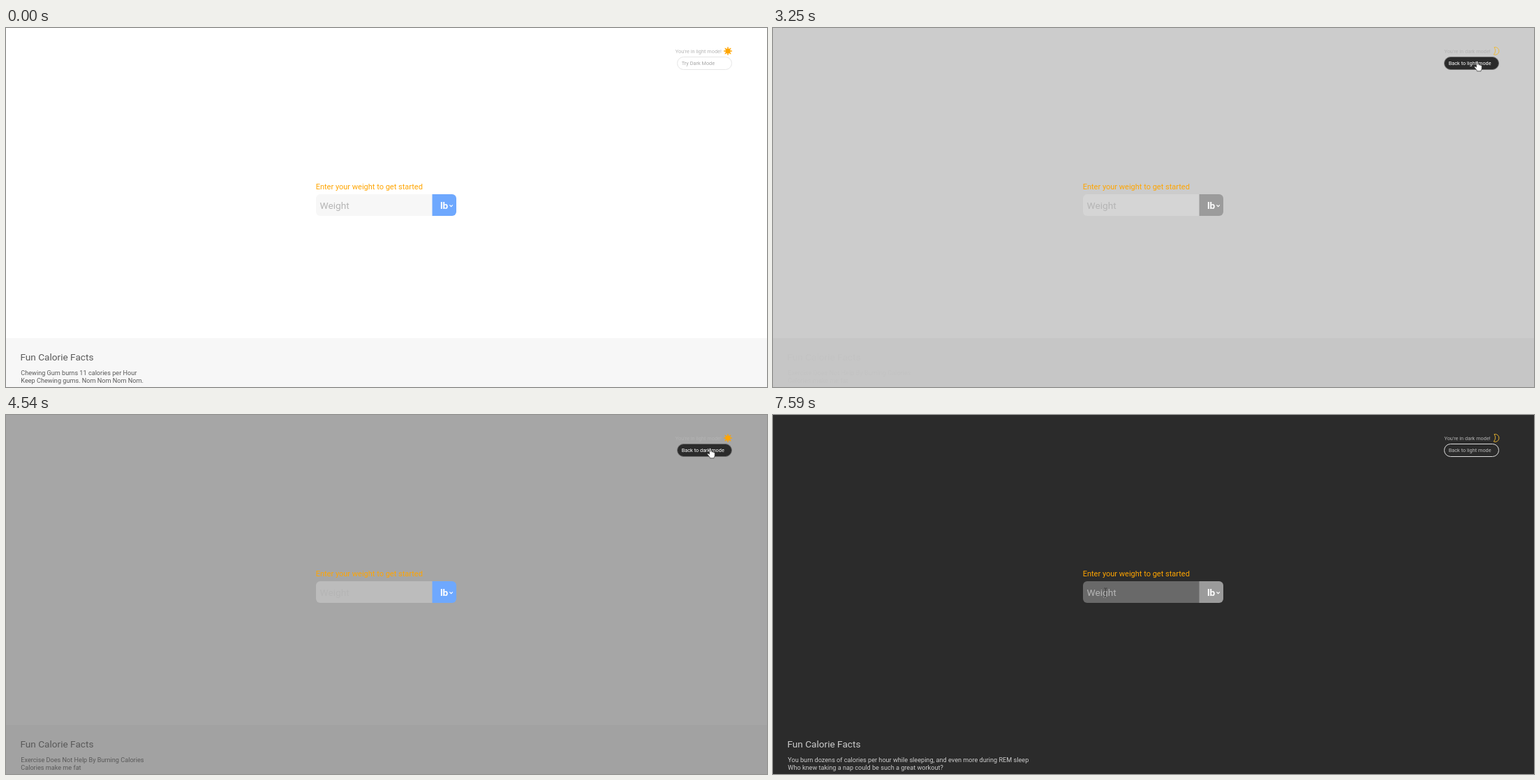
Write an HTML page that moves like this. It is 1090 px wide and 514 px high and loops after 8000 ms.

```html
<!DOCTYPE html>
<html lang="en">
<head>
<meta charset="utf-8">
<title>Calorie facts</title>
<style>
  html, body { margin: 0; width: 100%; height: 100%; overflow: hidden; background: #fff; }
  svg { display: block; width: 1090px; height: 514px; font-family: Roboto, sans-serif; }
  text { white-space: pre; }
</style>
</head>
<body>
<svg viewBox="0 0 1090 514" xmlns="http://www.w3.org/2000/svg">
  <rect id="page" width="1090" height="514"/>
  <rect id="footer" y="444" width="1090" height="70"/>

  <text id="modeText" y="35.6" font-size="7.35" fill="#b4b4b4"></text>
  <g id="sun" fill="#ffa500">
    <circle cx="1034" cy="33" r="3.5"/>
    <path id="rays"/>
  </g>
  <path id="moon" d="M1033 27.6A5.5 5.5 0 1 1 1032.3 38A8 8 0 0 0 1033 27.6Z" fill="none" stroke="#f0b92e" stroke-width=".9" stroke-linejoin="round"/>

  <rect id="button" x="961.5" y="41.5" width="78" height="18" rx="9"/>
  <text id="buttonText" x="967.7" y="53" font-size="7.35"></text>

  <text x="443.7" y="231" font-size="11" fill="#ffa500">Enter your weight to get started</text>
  <path id="field" d="M611 238H450a6 6 0 0 0-6 6v19a6 6 0 0 0 6 6H611Z"/>
  <path id="unit" d="M610.5 238H639a6 6 0 0 1 6 6v19a6 6 0 0 1-6 6H610.5Z"/>
  <text x="449.6" y="258.6" font-size="13.65" fill="#b5b5b5">Weight</text>
  <text x="622" y="258.6" font-size="13.65" font-weight="700" fill="#fff">lb</text>
  <path d="M635.4 253.4l2.2 2.2l2.2-2.2" fill="none" stroke="#fff" stroke-width="1.2"/>
  <path id="caret" d="M450.5 245V262" stroke="#fff" stroke-width=".8"/>

  <g id="facts">
    <text x="20.4" y="475.6" font-size="13.64">Fun Calorie Facts</text>
    <text id="line1" x="21.3" y="496.8" font-size="9.13"></text>
    <text id="line2" x="21.3" y="507.8" font-size="9.13"></text>
  </g>

  <circle id="press" r="7" fill="#ff0"/>
  <path id="arrow" d="M0 0V11.3L2.7 8.9L4.6 13.4L6.4 12.6L4.5 8.3L8 8Z" fill="#fff" stroke="#222" stroke-width=".7" stroke-linejoin="round"/>
  <path id="hand" d="M-1.6 0.6C-1.6-.9.6-.9.6.6V4.6C1-.2 2.6 4 2.6 5.2C3.4 4.2 4.5 4.7 4.6 5.7C5.7 5.2 6.3 5.9 6.3 6.9V9.5C6.3 11.5 5.2 12 5 13.8H-.6C-.8 12-3 10.2-4.3 8.2C-4.8 7-3.2 6.4-1.6 8.2Z" fill="#fff" stroke="#222" stroke-width=".7" stroke-linejoin="round"/>
  <path id="beam" d="M-2.3-6.5H-.6L0-6L.6-6.5H2.3M0-6V6M-2.3 6.5H-.6L0 6L.6 6.5H2.3" fill="none" stroke="#333" stroke-width=".8"/>
</svg>
<script>
const LOOP = 8000, FADE = 300;
const HOVER_IN = 2250, HOVER_OUT = 5910;
const el = {};
document.querySelectorAll("[id]").forEach(n => el[n.id] = n);

// Each switch: time, dark or light
const switches = [[-9999, 0], [3198, 1], [4440, 0], [5520, 1]];
const presses = [
  [2940, 3190, 1008, 48],
  [4140, 4440, 1008, 48],
  [5320, 5520, 1008, 48],
  [6970, 7390, 477, 255]
];
const facts = [
  [0, "Chewing Gum burns 11 calories per Hour", "Keep Chewing gums. Nom Nom Nom Nom."],
  [1980, "Exercise Does Not Help By Burning Calories", "Calories make me fat"],
  [6980, "You burn dozens of calories per hour while sleeping, and even more during REM sleep", "Who knew taking a nap could be such a great workout?"]
];

const linear = u => u;
const easeIn = u => u * u;
const easeOut = u => 1 - (1 - u) ** 2;
const easeBoth = u => u * u * (3 - 2 * u);
// Pointer stops: time, x, y, easing on the way there
const stops = [
  [340, 1003, 514, linear],
  [1130, 640, 257, easeBoth],
  [1990, 967, 111, easeBoth],
  [2340, 1016.5, 39, easeOut],
  [2790, 1009, 48, easeOut],
  [5860, 1009, 48, linear],
  [6340, 622, 188, easeIn],
  [6820, 474, 254.5, easeOut],
  [6970, 477, 255, linear],
  [7500, 477, 255, linear],
  [7590, 476.3, 254.5, linear]
];

const clamp = u => Math.min(1, Math.max(0, u));
const mix = (a, b, u) => a + (b - a) * u;
const gray = v => `rgb(${[v, v, v].map(Math.round)})`;
const show = (n, on) => n.style.display = on ? "" : "none";
const latest = (list, t) => list.filter(s => s[0] <= t).pop();

// The CSS "ease" curve, solved by bisection
function ease(u) {
  if (u <= 0 || u >= 1) return clamp(u);
  const bez = (a, b, s) => 3 * a * s * (1 - s) ** 2 + 3 * b * s * s * (1 - s) + s ** 3;
  let lo = 0, hi = 1;
  for (let i = 0; i < 20; i++) {
    const m = (lo + hi) / 2;
    if (bez(.25, .25, m) < u) lo = m; else hi = m;
  }
  return bez(.1, 1, lo);
}

function pointer(t) {
  const i = stops.findIndex(s => s[0] > t);
  if (i < 0) return stops[stops.length - 1].slice(1, 3);
  if (i === 0) return stops[0].slice(1, 3);
  const a = stops[i - 1], b = stops[i];
  const u = b[3]((t - a[0]) / (b[0] - a[0]));
  return [mix(a[1], b[1], u), mix(a[2], b[2], u)];
}

function setText(n, s) {
  if (n.textContent !== s) n.textContent = s;
}

function drawTheme(t) {
  const [since, dark] = latest(switches, t);
  const u = ease((t - since) / FADE);
  const d = dark ? u : 1 - u;
  const quick = Math.min(1, .75 + .7 * u);
  const page = mix(255, 43, d);
  const hover = ease((t - HOVER_IN) / FADE) * (1 - ease((t - HOVER_OUT) / FADE));

  el.page.setAttribute("fill", gray(page));
  el.footer.setAttribute("fill", gray(mix(247, 43, d)));
  el.field.setAttribute("fill", gray(mix(247, 105, d)));
  el.unit.setAttribute("fill", dark ? "#9b9b9b" : "#6ea8fe");
  el.facts.setAttribute("fill", gray(mix(89, 204, dark ? quick : 1 - quick)));

  el.button.setAttribute("fill", gray(mix(page, 43, hover)));
  el.button.setAttribute("stroke", gray(mix(mix(230, 221, d), 110, hover)));
  el.buttonText.setAttribute("fill", gray(mix(mix(165, 187, d), 255, clamp(hover * 2))));

  const mode = dark ? "dark" : "light", other = dark ? "light" : "dark";
  setText(el.modeText, `You're in ${mode} mode!`);
  el.modeText.setAttribute("x", dark ? 961.5 : 958.8);
  setText(el.buttonText, t < switches[1][0] ? "Try Dark Mode" : `Back to ${other} mode`);
  show(el.sun, !dark);
  show(el.moon, dark);
}

function drawPointer(t) {
  const [x, y] = pointer(t);
  const onButton = t > 2420 && x > 961 && y > 41 && y < 60;
  const onField = x > 444 && x < 610 && y > 238 && y < 269;
  const kind = onButton ? "hand" : onField ? "beam" : "arrow";
  for (const k of ["arrow", "hand", "beam"]) {
    show(el[k], t >= 370 && k === kind);
    el[k].setAttribute("transform", `translate(${x} ${y})`);
  }
  const p = presses.find(q => t >= q[0] && t < q[1]);
  show(el.press, p);
  if (p) {
    el.press.setAttribute("cx", p[2]);
    el.press.setAttribute("cy", p[3]);
    el.press.setAttribute("opacity", p[2] < 500 ? .6 * clamp((7390 - t) / 170) : .6);
  }
  show(el.caret, t >= 7530 && t < 7590);
}

function draw(t) {
  drawTheme(t);
  drawPointer(t);
  const [, first, second] = latest(facts, t);
  setText(el.line1, first);
  setText(el.line2, second);
}

const ray = i => {
  const at = (r, a) => `${1034 + r * Math.cos(a)} ${33 + r * Math.sin(a)}`;
  const a = i * Math.PI / 4;
  return `M${at(3.4, a - .3)}L${at(6.1, a - .07)}L${at(6.1, a + .07)}L${at(3.4, a + .3)}Z`;
};
el.rays.setAttribute("d", [...Array(8).keys()].map(ray).join(""));

const start = performance.now();
function tick() {
  draw((performance.now() - start) % LOOP);
  requestAnimationFrame(tick);
}
tick();
</script>
</body>
</html>
```
